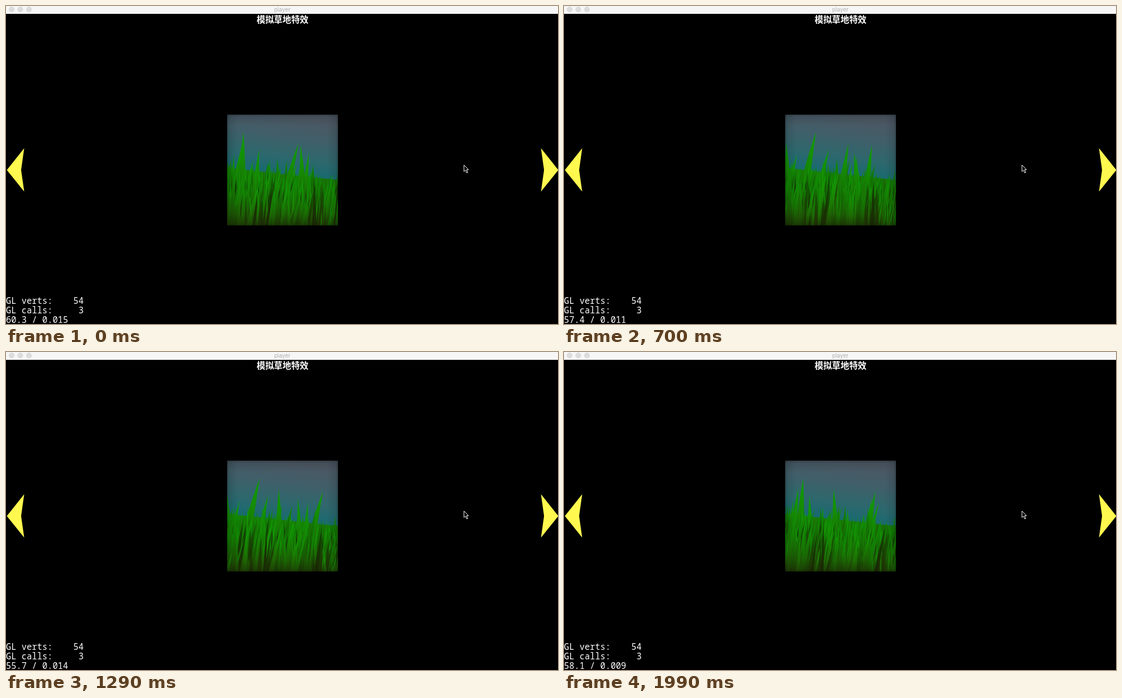
An HTML page with a canvas for the animation above (2.09 s loop, 986 by 568 pixels).

```html
<!DOCTYPE html>
<html lang="zh">
<head>
<meta charset="utf-8">
<title>player</title>
<style>
  html, body { margin: 0; width: 100%; height: 100%; overflow: hidden; background: #000; }
  svg, canvas { position: absolute; display: block; }
  svg { left: 0; top: 0; }
  canvas { left: 395px; top: 194px; }
  .bar { font: 10px Inter, sans-serif; fill: #b1b1b1; text-anchor: middle; }
  .title { font: bold 15.4px "Noto Sans CJK SC", "Noto Sans CJK", sans-serif; fill: #fff; text-anchor: middle; }
  .stats { font: 15.42px "Noto Sans Mono", monospace; fill: #fff; }
  .arrow { fill: #fff94f; }
</style>
</head>
<body>
<svg width="986" height="568" viewBox="0 0 986 568">
  <rect width="986" height="14" fill="#f6f6f6"/>
  <g fill="#dcdcdc" stroke="#d1d1d1" stroke-width=".6">
    <circle cx="10" cy="6.2" r="4.6"/>
    <circle cx="25.5" cy="6.2" r="4.6"/>
    <circle cx="41" cy="6.2" r="4.6"/>
  </g>
  <text class="bar" x="493.5" y="10">player</text>
  <text class="title" x="494" y="30">模拟草地特效</text>
  <path class="arrow" d="M1.5 293 32.5 254 27 293 32.5 331.5Z"/>
  <path class="arrow" d="M986.6 293 955.6 254 961.1 293 955.6 331.5Z"/>
  <path d="M818 284v11.6l2.7-2.5 2.2 5 2-.9-2.2-4.8h3.4Z" fill="#000" stroke="#fff" stroke-width="1"/>
  <g class="stats">
    <text x="0" y="532">GL&nbsp;verts:&nbsp;&nbsp;&nbsp;&nbsp;54</text>
    <text x="0" y="549">GL&nbsp;calls:&nbsp;&nbsp;&nbsp;&nbsp;&nbsp;3</text>
    <text x="0" y="566" id="rate">60.3 / 0.015</text>
  </g>
</svg>
<canvas id="meadow" width="198" height="198"></canvas>
<script>
const LOOP = 2090, HOLD = 90, SPEED = 1.9, LEAN = 0.1, SIZE = 198;
const ctx = document.getElementById('meadow').getContext('2d');
const rate = document.getElementById('rate');

// readout at a few moments: time (ms), frames per second, frame cost (ms)
const readout = [
  [0, 60.3, 15], [240, 60.1, 14], [530, 59.4, 8], [850, 55.4, 14],
  [1050, 55.7, 13], [1460, 55.6, 15], [1700, 56.6, 12], [1990, 58.1, 9]
];

// tallest blades: rest x and y of the tip, time of the rightmost pose (s)
const tall = [
  [146, 75, 2.08], [144, 68, 2.53], [57, 62, 0.82], [19, 49, 2.7],
  [105.5, 51, 0.05], [151, 54, 1.42], [37.5, 31, 1.03]
];

let seed = 4271;
function rnd() {
  seed = (seed * 16807) % 2147483647;
  return seed / 2147483647;
}

function tallBlade([x, y, peak]) {
  const h = 285 - y;
  return { x, y, h, w: 18 - y * 0.1, sway: 22, phase: -peak * SPEED, shade: 1, dark: 0 };
}

// k runs from 0 at the back to 1 at the front
function fieldBlade(k) {
  const x = rnd() * 235 - 18;
  const ridge = 89 + Math.max(0, Math.min(SIZE, x)) * 0.115;
  const spike = k < 0.45 ? 26 * rnd() ** 7 : 0;
  const h = 45 + 150 * k;
  return {
    x, h,
    y: ridge + (rnd() - 0.4) * 12 + rnd() * 75 * k * k - spike,
    w: 1.6 + (1.5 + 5 * rnd()) * k + spike * 0.08,
    sway: h * (0.05 + 0.06 * rnd()),
    phase: rnd() * Math.PI * 2,
    shade: 0.82 + 0.22 * rnd(),
    dark: k > 0.3 && rnd() < 0.25 ? 0.45 : 0
  };
}

// back to front, with the tall ones part of the way in
const COUNT = 420;
const blades = Array.from({ length: COUNT }, (_, i) => fieldBlade(i / COUNT));
blades.splice(COUNT * 0.4, 0, ...tall.map(tallBlade));

function ramp(x0, y0, x1, y1, ...stops) {
  const g = ctx.createLinearGradient(x0, y0, x1, y1);
  stops.forEach(([at, color]) => g.addColorStop(at, color));
  return g;
}

function fill(style) {
  ctx.fillStyle = style;
  ctx.fillRect(0, 0, SIZE, SIZE);
}

function rgb(r, g, b, s) {
  return `rgb(${r * s},${g * s},${b * s})`;
}

function drawBlade({ x, y, h, w, sway, phase, shade, dark }, t) {
  const bend = sway * Math.cos(SPEED * t + phase);
  const root = x - h * LEAN, foot = y + h, lit = 1 - dark;
  const low = root + h * LEAN / 3, high = root + h * LEAN * 2 / 3 + bend / 3;
  ctx.fillStyle = ramp(0, Math.min(foot, 212), 0, y,
    [0, rgb(36, 50, 6, shade)],
    [0.4, rgb(28, 106 * lit, 4, shade)],
    [0.75, rgb(20, 142 * lit, 3, shade)],
    [1, rgb(14, 158, 6, shade)]);
  ctx.beginPath();
  ctx.moveTo(root - w, foot);
  ctx.bezierCurveTo(low - w * 0.85, foot - h / 3, high - w * 0.6, foot - h * 2 / 3, x + bend, y);
  ctx.bezierCurveTo(high + w * 0.6, foot - h * 2 / 3, low + w * 0.85, foot - h / 3, root + w, foot);
  ctx.fill();
}

function drawSky() {
  fill(ramp(35, -8, 18, 116,
    [0, '#4c5763'], [0.3, '#405f69'], [0.6, '#2c686d'], [0.85, '#166a72'], [1, '#0b647b']));
}

function drawGround() {
  ctx.fillStyle = ramp(0, 92, 0, SIZE, [0, '#178404'], [0.4, '#1d5c06'], [1, '#2a300a']);
  ctx.beginPath();
  ctx.moveTo(0, 95);
  ctx.lineTo(SIZE, 117);
  ctx.lineTo(SIZE, SIZE);
  ctx.lineTo(0, SIZE);
  ctx.fill();
}

function drawVignette() {
  const fade = [[0, 'rgba(0,0,0,.28)'], [0.2, 'rgba(0,0,0,.1)'], [1, 'rgba(0,0,0,0)']];
  fill(ramp(0, 0, 20, 0, ...fade));
  fill(ramp(SIZE, 0, SIZE - 20, 0, ...fade));
  fill(ramp(0, 0, 0, 20, ...fade));
  fill(ramp(0, SIZE, 0, SIZE - 20, ...fade));
}

// holds of about 90 ms, spread evenly between the readout moments
function held(now) {
  const i = readout.findLastIndex(r => r[0] <= now);
  const from = readout[i], to = readout[i + 1];
  if (!to) return from;
  const gap = to[0] - from[0], n = Math.round(gap / HOLD);
  const part = Math.floor((now - from[0]) / gap * n) / n;
  return from.map((v, j) => v + (to[j] - v) * part);
}

function draw([ms, fps, cost]) {
  drawSky();
  drawGround();
  blades.forEach(b => drawBlade(b, ms / 1000));
  drawVignette();
  rate.textContent = `${fps.toFixed(1)} / ${(cost / 1000).toFixed(3)}`;
}

let shown = -1;
function tick() {
  const step = held(performance.now() % LOOP);
  if (step[0] !== shown) {
    shown = step[0];
    draw(step);
  }
  requestAnimationFrame(tick);
}
tick();
</script>
</body>
</html>
```
